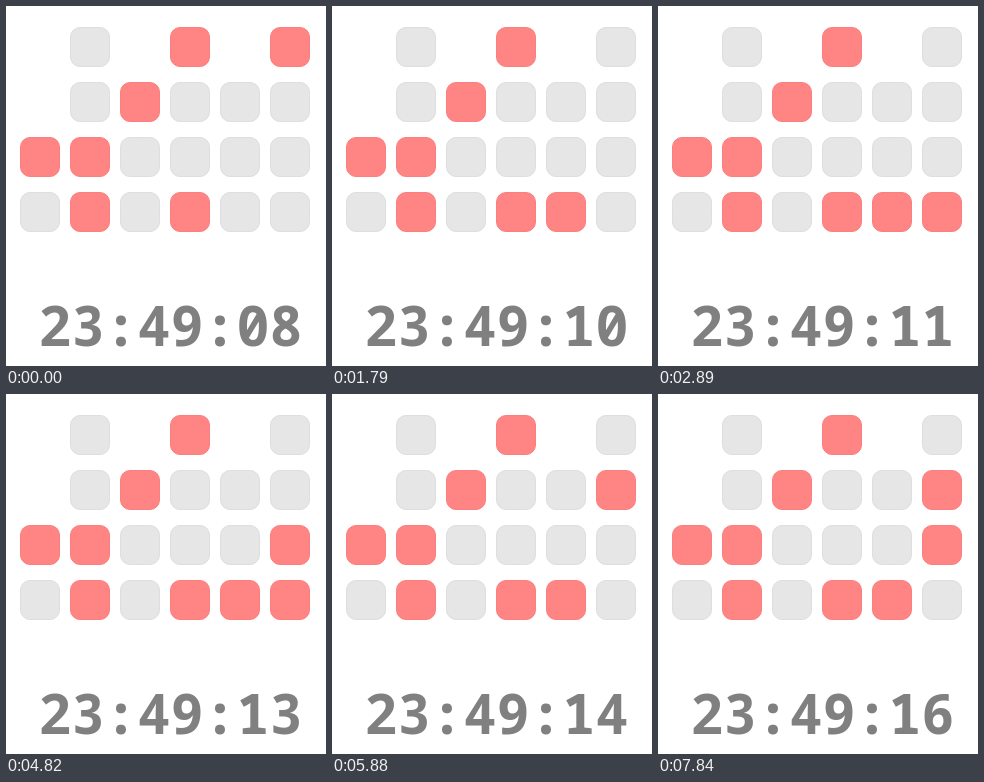
These frames come from a looping animation (320x360 px, 8000 ms). An HTML page:

```html
<!DOCTYPE html>
<html lang="en">
<head>
<meta charset="utf-8">
<title>Binary clock</title>
<style>
  html, body { margin: 0; width: 100%; height: 100%; overflow: hidden; background: #fff; }
  svg { display: block; width: 320px; height: 360px; }
  rect { fill: #e6e6e6; stroke: #dedede; }
  rect.on { fill: #ff8585; stroke: #fb7f7f; }
  text { font: bold 55px "Noto Sans Mono", "DejaVu Sans Mono", monospace; fill: #808080; text-anchor: middle; }
</style>
</head>
<body>
<svg viewBox="0 0 320 360">
  <g id="cells"></g>
  <text id="time" x="164.5" y="340"></text>
</svg>
<script>
  const LOOP = 8000;
  const TICKS = [890, 1790, 2890, 3720, 4820, 5880, 6910, 7840];
  const FIRST_SECOND = 8;
  const BITS = [2, 4, 3, 4, 3, 4]; // cells per digit column

  const group = document.getElementById('cells');
  const label = document.getElementById('time');

  function addCell(column, bit) {
    const cell = document.createElementNS('http://www.w3.org/2000/svg', 'rect');
    const attributes = { x: 14.5 + 50 * column, y: 186.5 - 55 * bit, width: 39, height: 39, rx: 9.5 };
    for (const name in attributes) cell.setAttribute(name, attributes[name]);
    return group.appendChild(cell);
  }

  const columns = BITS.map((count, column) =>
    Array.from({ length: count }, (_, bit) => addCell(column, bit)));

  let shown = -1;
  function draw(now) {
    const time = now % LOOP;
    const second = FIRST_SECOND + TICKS.filter(tick => tick <= time).length;
    if (second === shown) return;
    shown = second;
    const text = '23:49:' + String(second).padStart(2, '0');
    const digits = text.replace(/:/g, '');
    label.textContent = text;
    columns.forEach((cells, column) => cells.forEach((cell, bit) =>
      cell.classList.toggle('on', Boolean(digits[column] >> bit & 1))));
  }

  const start = performance.now();
  function frame() {
    draw(performance.now() - start);
    requestAnimationFrame(frame);
  }
  frame();
</script>
</body>
</html>
```
